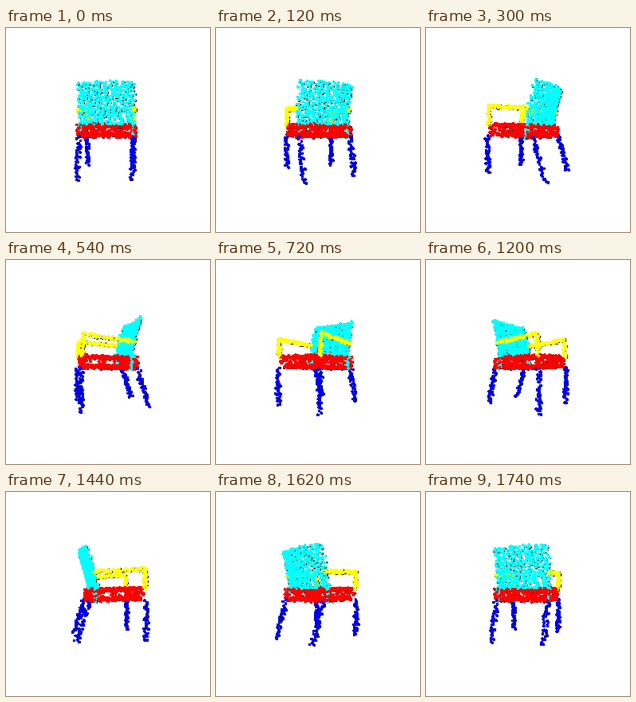
A matplotlib script that plays this animation: 256x256 px, repeating every 1800 ms.

```python
import numpy as np
import matplotlib.pyplot as plt
from matplotlib.animation import FuncAnimation

SIZE, DPI = 256, 100
FRAMES, INTERVAL = 30, 60
FOCAL = 222            # 60 degree field of view
START = np.radians(-5)
CYAN, YELLOW, RED, BLUE = (0, 1, 1), (1, 1, 0), (1, 0, 0), (0, 0, 0.9)

rng = np.random.default_rng(7)
parts, tints = [], []


def spread(n):
    """Evenly scattered points in the unit cube."""
    steps = 1.22074408 ** -np.arange(1, 4)
    even = rng.random(3) + np.arange(1, n + 1)[:, None] * steps
    return (even + rng.normal(0, 0.02, (n, 3))) % 1


def add(points, tint):
    parts.append(points)
    tints.extend([tint] * len(points))


def beam(n, a, b, thick, tint):
    """Bar from a to b; axes are width, depth (back positive), height."""
    a, b = np.array(a, float), np.array(b, float)
    t = (np.arange(n) + rng.random(n))[:, None] / n
    add(a + (b - a) * t + (rng.random((n, 3)) - 0.5) * thick, tint)


def seat_z(v, top):
    """Seat height at depth v; top runs from 0 (underside) to 1."""
    k = (v + 34) / 61
    low, high = -6.8 - 2 * k, 8.3 - 2 * k
    return low + (high - low) * top


def seat_face(n, u=(-33, 33), v=(-34, 27), top=(0, 1)):
    p = spread(n)
    lo, hi = np.array([u, v, top], float).T
    p = lo + (hi - lo) * p
    p[:, 2] = seat_z(p[:, 1], p[:, 2])
    add(p, RED)


def back_depth(u, z):
    lean = np.clip((z + 5) / 57, 0, 1)
    return 21 + 14 * lean ** 1.3 - 4.5 * (u / 32) ** 2


def build():
    p = spread(430)
    u, z = 64 * p[:, 0] - 32, 6 + 46 * p[:, 1]
    add(np.c_[u, back_depth(u, z) + 3 * p[:, 2] - 1.5, z], CYAN)

    seat_face(190, top=(0.78, 1))
    seat_face(190, top=(0, 0.25))
    seat_face(100, v=(-34, -32))
    seat_face(85, v=(25, 27), top=(0, 0.8))

    for side in (-1, 1):
        u = side * 33.5
        seat_face(32, u=(side * 32, side * 33))
        beam(16, (side * 31, 20, -8), (side * 31, 21, 8), 3, CYAN)
        beam(42, (u, -36, -8), (u, -36.5, -52), 5, BLUE)
        beam(42, (side * 30, 27, -8), (side * 28.5, 41, -51), 5, BLUE)
        beam(30, (u, -35, 7), (u, -34, 28), 4, YELLOW)
        beam(62, (u, -35, 28.5), (side * 31.5, 24, 23), 4, YELLOW)


def project(angle):
    u, v, z = cloud.T
    c, s = np.cos(angle), np.sin(angle)
    near = v * c - u * s
    scale = FOCAL / (FOCAL - near)
    order = np.argsort(near)
    x = SIZE / 2 + (u * c + v * s) * scale
    y = SIZE / 2 - z * scale
    return np.c_[x, y][order], order


build()
cloud, tints = np.vstack(parts), np.array(tints)

fig = plt.figure(figsize=(SIZE / DPI, SIZE / DPI), dpi=DPI, facecolor="white")
ax = fig.add_axes([0, 0, 1, 1])
ax.set(xlim=(0, SIZE), ylim=(SIZE, 0))
ax.axis("off")


def dots(px, color):
    blank = np.zeros(len(cloud))
    return ax.scatter(blank, blank, s=(px * 72 / DPI) ** 2, c=color,
                      linewidths=0, antialiased=False)


rims, fills = dots(3.3, "black"), dots(2.5, tints)


def draw(i):
    xy, order = project(START + 2 * np.pi * i / FRAMES)
    rims.set_offsets(xy)
    fills.set_offsets(xy)
    fills.set_facecolors(tints[order])
    return rims, fills


anim = FuncAnimation(fig, draw, frames=FRAMES, interval=INTERVAL,
                     repeat=True, repeat_delay=0)
plt.show()
```
